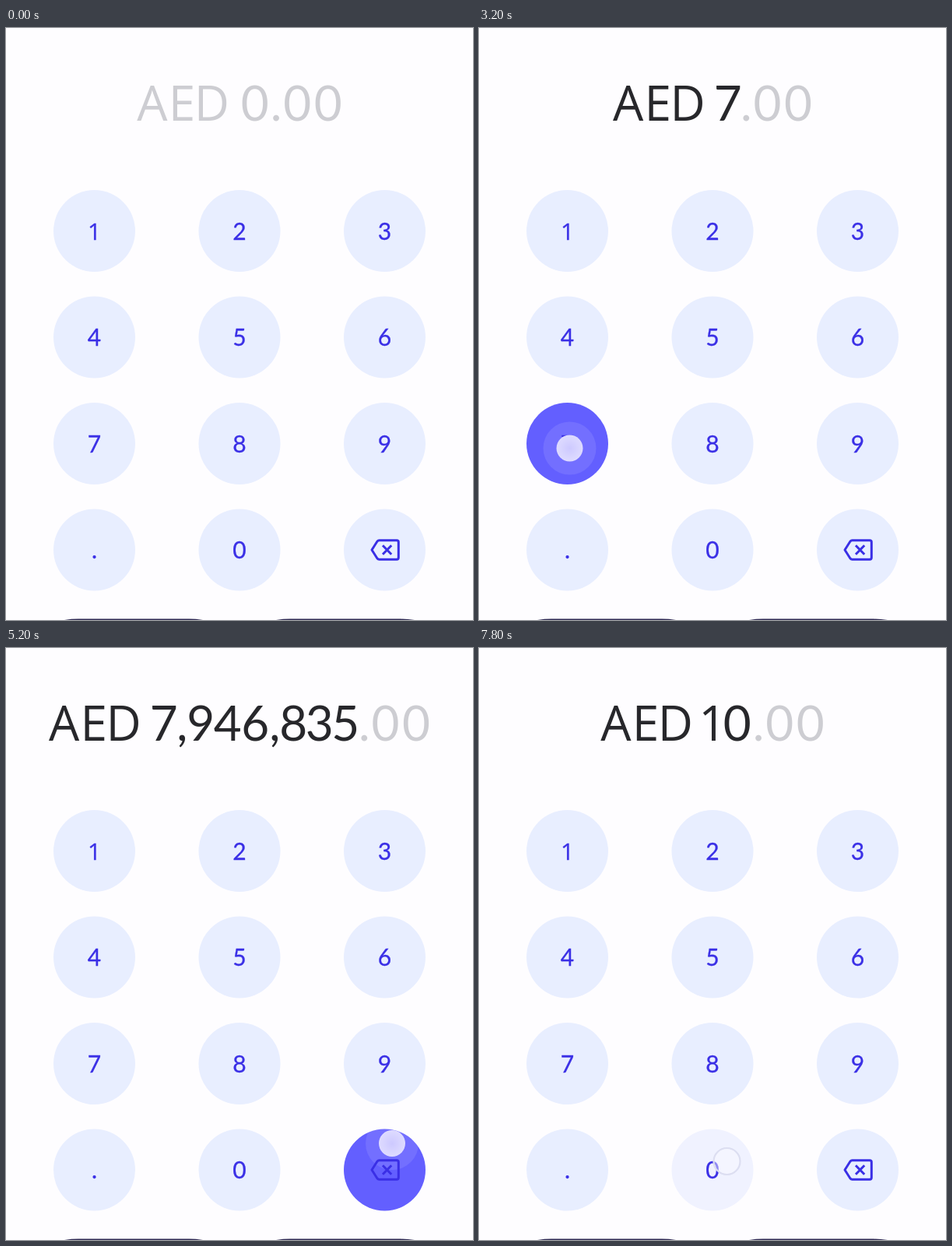
Recreate the animation shown at these times as an HTML page. Size 600x760 px, loop 8000 ms.

```html
<!DOCTYPE html>
<html lang="en">
<head>
<meta charset="utf-8">
<title>Amount keypad</title>
<style>
  html, body { margin: 0; width: 100%; height: 100%; overflow: hidden; background: #fefdff; }
  svg { display: block; width: 600px; height: 760px; }
  text { font-family: Lato, "Open Sans", sans-serif; text-anchor: middle; white-space: pre; }
  .plain { font-family: "Open Sans", "Noto Sans", sans-serif; }
  #amount { font-size: 62px; }
  .digit { font-size: 30px; fill: #3a2fe6; stroke: #3a2fe6; stroke-width: .3; }
</style>
</head>
<body>
<svg id="stage" viewBox="0 0 600 760" xmlns="http://www.w3.org/2000/svg">
  <defs>
    <clipPath id="clip"><circle id="clipDisc" r="52.5"/></clipPath>
    <radialGradient id="tip">
      <stop offset="0" stop-color="#cdc9ff"/>
      <stop offset="1" stop-color="#dedbff"/>
    </radialGradient>
  </defs>
  <rect width="600" height="760" fill="#fefdff"/>
  <text id="amount" y="118.5"></text>
  <g id="discs"></g>
  <g clip-path="url(#clip)"><circle id="glow" r="34" fill="#fff" fill-opacity=".1"/></g>
  <g id="labels"></g>
  <g fill="#302b55">
    <path d="M75 760Q84 758.6 93 758.6H235Q244 758.6 253 760Z"/>
    <path d="M347 760Q356 758.6 365 758.6H507Q516 758.6 525 760Z"/>
  </g>
  <circle id="touch" r="17"/>
</svg>
<script>
const NS = 'http://www.w3.org/2000/svg';
const $ = id => document.getElementById(id);
const LOOP = 8000, STEP = 200, GREY = '#cdcdd2', INK = '#27272b';

function add(parent, tag, attrs, text) {
  const el = document.createElementNS(NS, tag);
  set(el, attrs);
  if (text) el.textContent = text;
  parent.appendChild(el);
  return el;
}
function set(el, attrs) {
  for (const k in attrs) el.setAttribute(k, attrs[k]);
}

// Keypad; "<" is the delete key
const keys = {};
[...'123456789.0<'].forEach((name, i) => {
  const x = 113.5 + i % 3 * 186.5, y = 260.5 + Math.floor(i / 3) * 136.5;
  const disc = add($('discs'), 'circle', { cx: x, cy: y, r: 52.5 });
  if (name === '<') {
    add($('labels'), 'path', {
      d: 'M-16.5 0L-9.5 -11Q-8.5 -12.2 -7 -12.2H15.5Q17.8 -12.2 17.8 -10V10Q17.8 12.2 15.5 12.2H-7Q-8.5 12.2 -9.5 11ZM-2.5 -5.8L8.7 5.8M8.7 -5.8L-2.5 5.8',
      transform: `translate(${x} ${y})`, fill: 'none', stroke: '#3a2fe6',
      'stroke-width': 3, 'stroke-linejoin': 'round'
    });
  } else {
    add($('labels'), 'text', { x, y: y + 11, class: name === '1' ? 'digit plain' : 'digit' }, name);
  }
  keys[name] = { x, y, disc };
});

const advance = { A: 40, E: 36, D: 41, ' ': 15, ',': 15, '.': 15,
  0: 39.5, 1: 24, 3: 34, 4: 36, 5: 33, 6: 35, 7: 32, 8: 33, 9: 33 };

function drawAmount(value) {
  const whole = 'AED ' + value.toLocaleString('en-US');
  const chars = [...whole + '.00'];
  let x = 300.7 - chars.reduce((sum, c) => sum + advance[c], 0) / 2;
  $('amount').textContent = '';
  chars.forEach((c, i) => {
    add($('amount'), 'tspan', {
      x: x + advance[c] / 2,
      fill: value && i < whole.length ? INK : GREY,
      class: 'AED1'.includes(c) ? 'plain' : ''
    }, c);
    x += advance[c];
  });
}

// Time, key, phase, finger offset from the key centre
const taps = [
  [1800, '.', 'in', 4, 3], [2000, '.', 'down', 4, 3], [2200, '.', 'out', 4, 3],
  [2400, '<', 'down', 12.5, 6], [2600, '<', 'out', 12.5, 6],
  [3000, '7', 'in', 3, 6], [3200, '7', 'down', 3, 6],
  [3400, '9', 'out', 2, 5],
  [3600, '4', 'down', 4, 6],
  [3800, '6', 'in', 3, 10], [4000, '6', 'out', 3, 10],
  [4200, '8', 'down', 4, 2], [4400, '3', 'out', 3, 8],
  [4600, '5', 'in', 4.5, -5.5], [4800, '5', 'down', 4.5, -5.5], [5000, '5', 'out', 4.5, -5.5],
  [5200, '<', 'down', 9.5, -34], [6400, '<', 'out', 9.5, -34],
  [7200, '1', 'in', 4, 4], [7400, '1', 'down', 4, 4],
  [7600, '0', 'in', 18.5, -11], [7800, '0', 'out', 18.5, -11]
];
const typed = [[3200, 7], [3400, 79], [3600, 794], [4000, 7946], [4200, 79468],
  [4400, 794683], [4800, 7946835], [7400, 1], [7800, 10]];

const discFill = { in: '#edf2ff', down: '#635fff', out: '#f0f2ff' };
const touchLook = {
  in: { fill: '#fff', 'fill-opacity': .45, stroke: '#d2d1ec', 'stroke-width': 2.2 },
  down: { fill: 'url(#tip)', 'fill-opacity': 1, stroke: 'none' },
  out: { fill: '#f8f8ff', 'fill-opacity': .45, stroke: '#dcdef1', 'stroke-width': 2.2 }
};

function tapAt(t) {
  if (t >= 5200 && t < 6400) return taps.find(p => p[0] === 5200);
  return taps.find(p => p[0] === t);
}
function valueAt(t) {
  // Holding delete drops one digit per step
  if (t >= 5400 && t < 7400) return Math.floor(7946835 / 10 ** ((t - 5200) / STEP));
  return typed.reduce((v, p) => p[0] <= t ? p[1] : v, 0);
}

function draw(t) {
  const tap = tapAt(t), before = tapAt(t - STEP);
  drawAmount(valueAt(t));
  for (const k in keys) keys[k].disc.setAttribute('fill', '#e8eeff');
  if (before && before[2] === 'down') keys[before[1]].disc.setAttribute('fill', discFill.in);
  $('touch').style.display = tap ? '' : 'none';
  $('glow').style.display = tap && tap[2] === 'down' ? '' : 'none';
  if (!tap) return;
  const [, name, phase, dx, dy] = tap, key = keys[name];
  const spot = { cx: key.x + dx, cy: key.y + dy };
  key.disc.setAttribute('fill', discFill[phase]);
  set($('clipDisc'), { cx: key.x, cy: key.y });
  set($('glow'), spot);
  set($('touch'), { ...spot, ...touchLook[phase] });
}

let start = null, shown = -1;
function tick(now) {
  if (start === null) start = now;
  const t = Math.floor((now - start) % LOOP / STEP) * STEP;
  if (t !== shown) draw(shown = t);
  requestAnimationFrame(tick);
}
draw(0);
requestAnimationFrame(tick);
</script>
</body>
</html>
```
